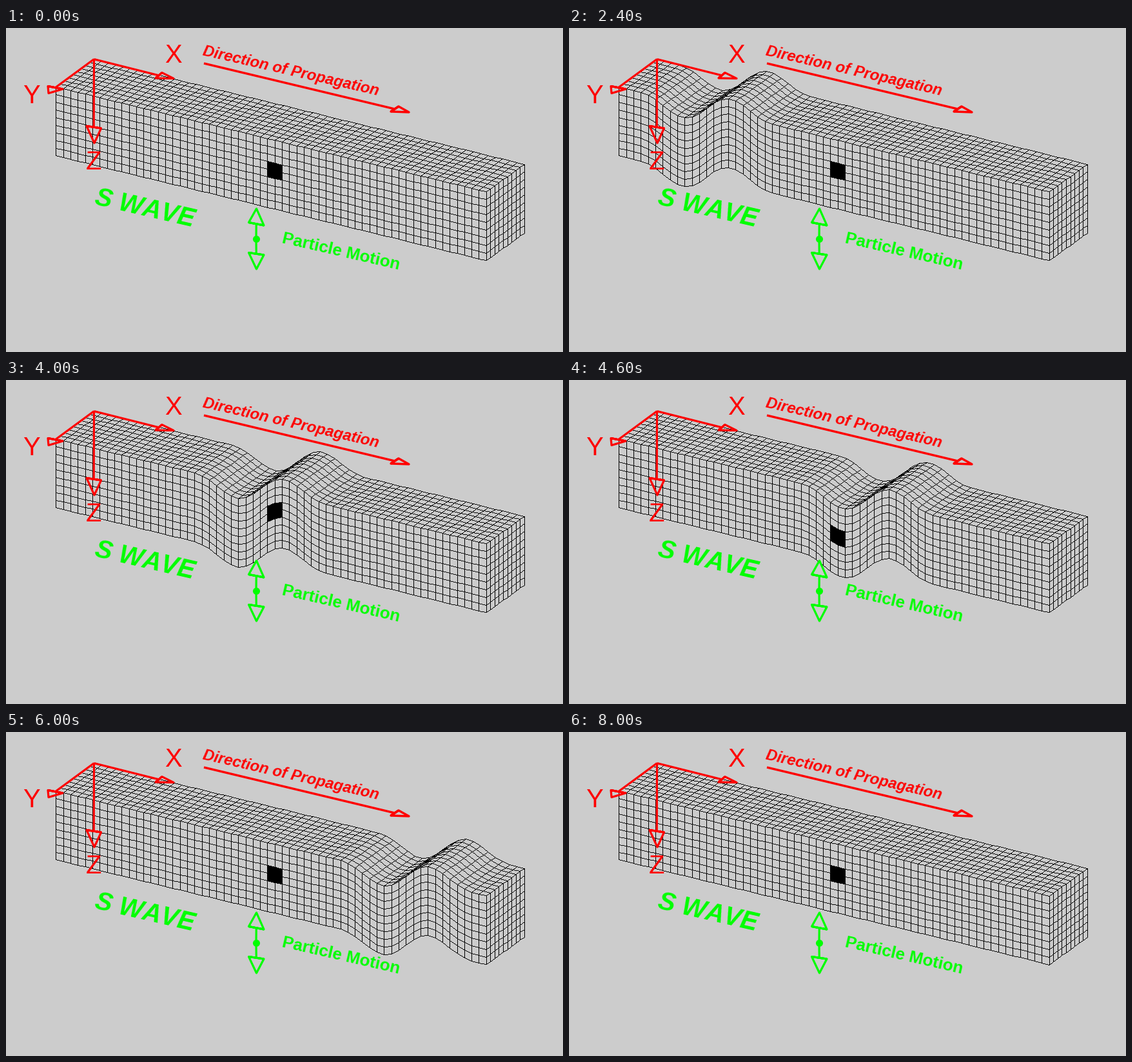
A matplotlib script for the animation above (9000 ms loop, 864 by 504 pixels).

```python
import numpy as np
import matplotlib.pyplot as plt
from matplotlib.animation import FuncAnimation
from matplotlib.patches import Polygon

W, H, DPI = 864, 504, 100
PX = 72 / DPI                       # points per pixel
RED, GREEN = "#ff0000", "#00ff00"
LIGHT = 0.8                         # background grey level

# Block geometry: nodes along x, y (depth) and z (down), in pixels
NX, NY, NZ = 60, 10, 10
CORNER = np.array([77.4, 91.4])     # front top left
LENGTH = np.array([667.4, 163.0])
DEPTH = np.array([59.0, -42.8])
HEIGHT = np.array([0.0, 107.0])

# Wave packet
AMP, HALF = 36.1, 10                # pixels, cells
SPEED, START = 2, -12               # cells per frame, first centre
MOVING, FRAMES, STEP_MS = 40, 45, 200
MAX_EDGE = 18                       # longest mesh edge, in pixels

plt.rcParams["text.kerning_factor"] = 6   # plain letter spacing

fig = plt.figure(figsize=(W / DPI, H / DPI), dpi=DPI, facecolor=str(LIGHT))
ax = fig.add_axes([0, 0, 1, 1])
ax.axis("off")


def shift(n):
    """Downward displacement of every x node at step n."""
    u = np.arange(NX) - (START + SPEED * n)
    d = -AMP * np.sin(np.pi * u / HALF) * np.cos(np.pi * u / (2 * HALF)) ** 2
    return np.where(np.abs(u) < HALF, d, 0)


def to_pixel(p):
    return np.floor(p + 0.5).astype(int)


def project(i, j, k, d):
    """Pixel of nodes (x index, depth index, z index)."""
    i, j, k = np.broadcast_arrays(i, j, k)
    p = (CORNER
         + (i / (NX - 1))[..., None] * LENGTH
         + (j / (NY - 1))[..., None] * DEPTH
         + (k / (NZ - 1))[..., None] * HEIGHT)
    p[..., 1] += d[i]
    return to_pixel(p)


def trace(img, a, b):
    """Draw one-pixel lines from nodes a to nodes b, one step per pixel."""
    a, b = a.reshape(-1, 1, 2), b.reshape(-1, 1, 2)
    steps = np.maximum(np.abs(b - a).max(axis=2, keepdims=True), 1)
    t = np.minimum(np.arange(MAX_EDGE + 1)[None, :, None] / steps, 1)
    p = to_pixel(a + (b - a) * t)
    img[p[..., 1], p[..., 0]] = 0


def block(d):
    x, y, z = np.arange(NX), np.arange(NY), np.arange(NZ)
    img = np.full((H, W), LIGHT)
    for sheet in (project(x[None, :], y[:, None], 0, d),
                  project(x[None, :], 0, z[:, None], d),
                  project(NX - 1, y[:, None], z[None, :], d)):
        trace(img, sheet[:-1], sheet[1:])
        trace(img, sheet[:, :-1], sheet[:, 1:])
    return img


def marked_cells(d):
    p = project(np.arange(29, 32)[None, :], 0, np.array([[3], [5]]), d) + 0.5
    return np.concatenate([p[0], p[1][::-1]])


def line(points, color, width=3.2, closed=False):
    pts = list(points) + ([points[0], points[1]] if closed else [])
    xs, ys = zip(*pts)
    ax.plot(xs, ys, color=color, lw=width * PX, zorder=5,
            solid_capstyle="butt", solid_joinstyle="round")


def arrow(start, a, b, tip, color, width=3.2):
    """Shaft up to the middle of base a-b, then a hollow head."""
    mid = ((a[0] + b[0]) / 2, (a[1] + b[1]) / 2)
    line([start, mid], color, width)
    line([a, b, tip], color, width, closed=True)


def label(x, y, text, size, color, angle=0, **style):
    ax.text(x, y, text, fontsize=size * PX, color=color, rotation=angle,
            rotation_mode="anchor", ha="left", va="baseline", zorder=6,
            family="Liberation Sans", **style)


mesh = ax.imshow(np.full((H, W), LIGHT), cmap="gray", vmin=0, vmax=1,
                 extent=(0, W, H, 0), interpolation="nearest",
                 aspect="auto", zorder=1)
mark = Polygon(marked_cells(shift(0)), closed=True, facecolor="black",
               edgecolor="none", lw=0, antialiased=False, zorder=2)
ax.add_patch(mark)

# Coordinate axes
ORIGIN = (136.5, 48.5)
arrow(ORIGIN, (232, 78), (242, 69.5), (260, 78.5), RED)
arrow(ORIGIN, (65, 90.5), (88, 95), (66, 101.5), RED)
arrow(ORIGIN, (125, 152.5), (147.5, 156), (137, 179), RED)
label(246.5, 54.5, "X", 40, RED)
label(26.5, 117, "Y", 40, RED)
label(123.5, 219.5, "Z", 40, RED)

# Direction of travel
arrow((307, 55), (597, 130), (609, 122), (625, 131), RED, 3.4)
label(304, 42.5, "Direction of Propagation", 24, RED, -13,
      weight="bold", style="italic")

# Particle motion
arrow((388, 328), (376.5, 302.5), (400, 307), (388.5, 281), GREEN)
arrow((388, 328), (376.5, 349.5), (400, 353), (388.5, 375), GREEN)
ax.plot(388, 328, "o", ms=11 * PX, color=GREEN, mew=0, zorder=6)
label(136, 274, "S WAVE", 40, GREEN, -13, weight="bold", style="italic")
label(427, 334, "Particle Motion", 26, GREEN, -13, weight="bold")

ax.set_xlim(0, W)
ax.set_ylim(H, 0)


def draw(frame):
    d = shift(min(frame, MOVING))
    mesh.set_data(block(d))
    mark.set_xy(marked_cells(d))
    return mesh, mark


anim = FuncAnimation(fig, draw, frames=FRAMES, interval=STEP_MS,
                     repeat=True, repeat_delay=0, blit=False)
plt.show()
```
